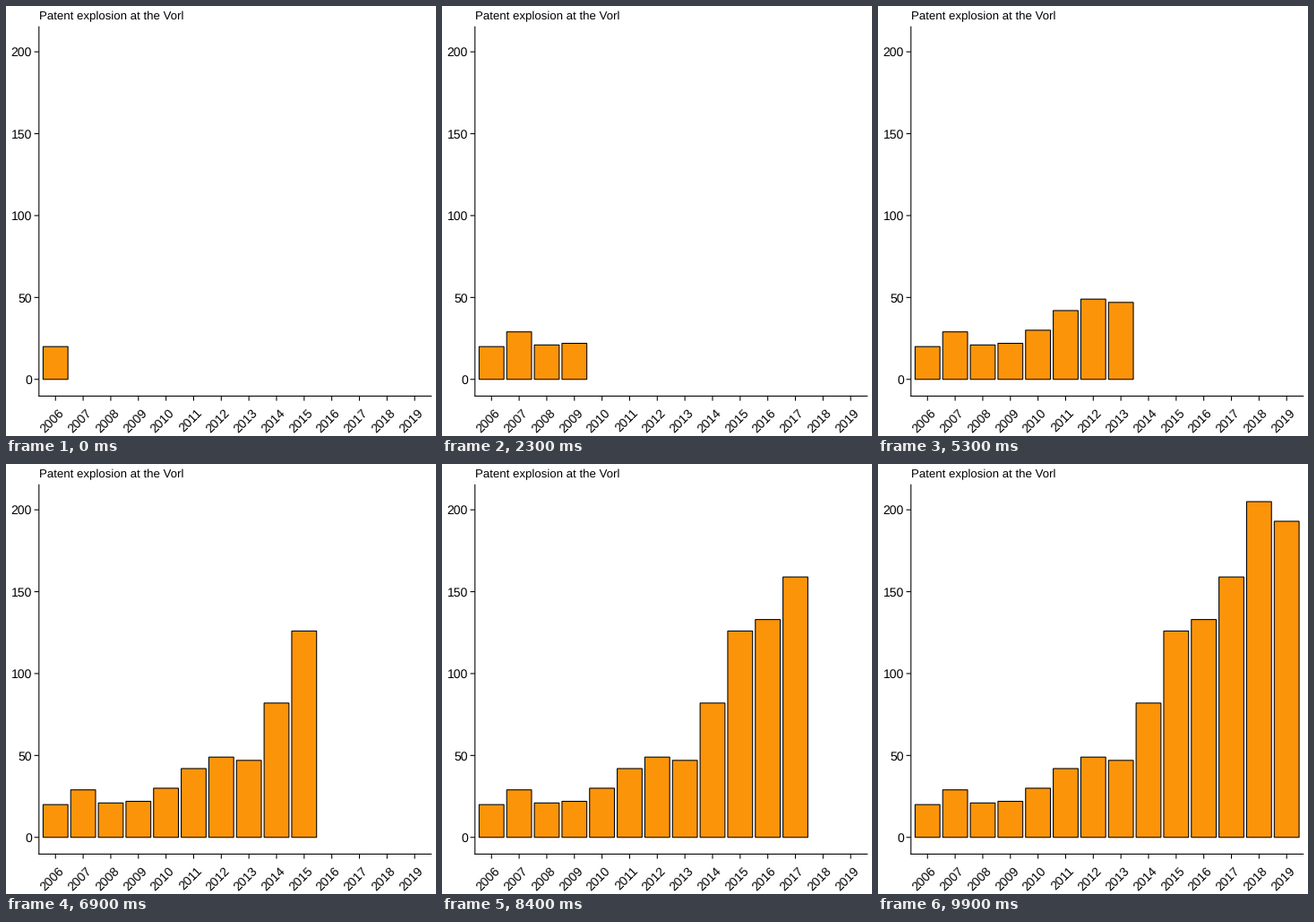
Write a matplotlib script that moves like this. It is 480 px wide and 480 px high and loops after 10 s.

```python
import matplotlib.pyplot as plt
from matplotlib.animation import FuncAnimation
from matplotlib.patches import Rectangle

SIZE = 480
FRAMES = 100
INTERVAL = 100
LINE = 1.07
ORANGE = "#fc940a"

FIRST_YEAR = 2006
COUNTS = [20, 29, 21, 22, 30, 42, 49, 47, 82, 126, 133, 159, 205, 193]

# Pixel geometry, with y measured downwards
LEFT, RIGHT, TOP, BOTTOM = 36.8, 474.7, 23.2, 435.45
FIRST_X, STEP = 55.27, 30.84
ZERO_Y, UNIT = 416.75, 1.828
BAR_WIDTH = 0.9 * STEP
TICK = 5.2

plt.rcParams["font.family"] = "Liberation Sans"
plt.rcParams["text.hinting"] = "none"

fig = plt.figure(figsize=(SIZE / 72, SIZE / 72), dpi=72, facecolor="white")
ax = fig.add_axes([0, 0, 1, 1])
ax.set_xlim(0, SIZE)
ax.set_ylim(SIZE, 0)
ax.axis("off")


def bar_x(i):
    return FIRST_X + STEP * i


def value_y(value):
    return ZERO_Y - UNIT * value


def line(x0, y0, x1, y1, cap="butt"):
    ax.plot([x0, x1], [y0, y1], color="black", lw=LINE,
            solid_capstyle=cap, snap=False)


def label(x, y, text, size, **kw):
    ax.text(x, y, text, fontsize=size, color="black", va="baseline", **kw)


def draw_axes():
    line(LEFT, TOP, LEFT, BOTTOM, "projecting")
    line(LEFT, BOTTOM, RIGHT, BOTTOM, "projecting")
    for value in range(0, 201, 50):
        y = value_y(value)
        line(LEFT - TICK, y, LEFT, y)
        label(28.8, y + 5.1, str(value), 14, ha="right")
    for i in range(len(COUNTS)):
        x = bar_x(i)
        line(x, BOTTOM, x, BOTTOM + TICK)
        label(x + 10, 454.5, str(FIRST_YEAR + i), 14, ha="right",
              rotation=45, rotation_mode="anchor")
    label(LEFT, 15, "Patent explosion at the Vorl", 13.2, ha="left")


def make_bar(i, count):
    bar = Rectangle((bar_x(i) - BAR_WIDTH / 2, value_y(count)),
                    BAR_WIDTH, UNIT * count, facecolor=ORANGE,
                    edgecolor="black", lw=LINE, joinstyle="miter", snap=False)
    return ax.add_patch(bar)


draw_axes()
bars = [make_bar(i, count) for i, count in enumerate(COUNTS)]


def update(frame):
    # Bars appear evenly, the last one on the final frame
    gap = (FRAMES - 1) / (len(bars) - 1)
    for i, bar in enumerate(bars):
        bar.set_visible(frame >= round(i * gap))
    return bars


anim = FuncAnimation(fig, update, frames=FRAMES, interval=INTERVAL,
                     init_func=lambda: update(0), repeat=True,
                     repeat_delay=0, blit=False)
plt.show()
```
